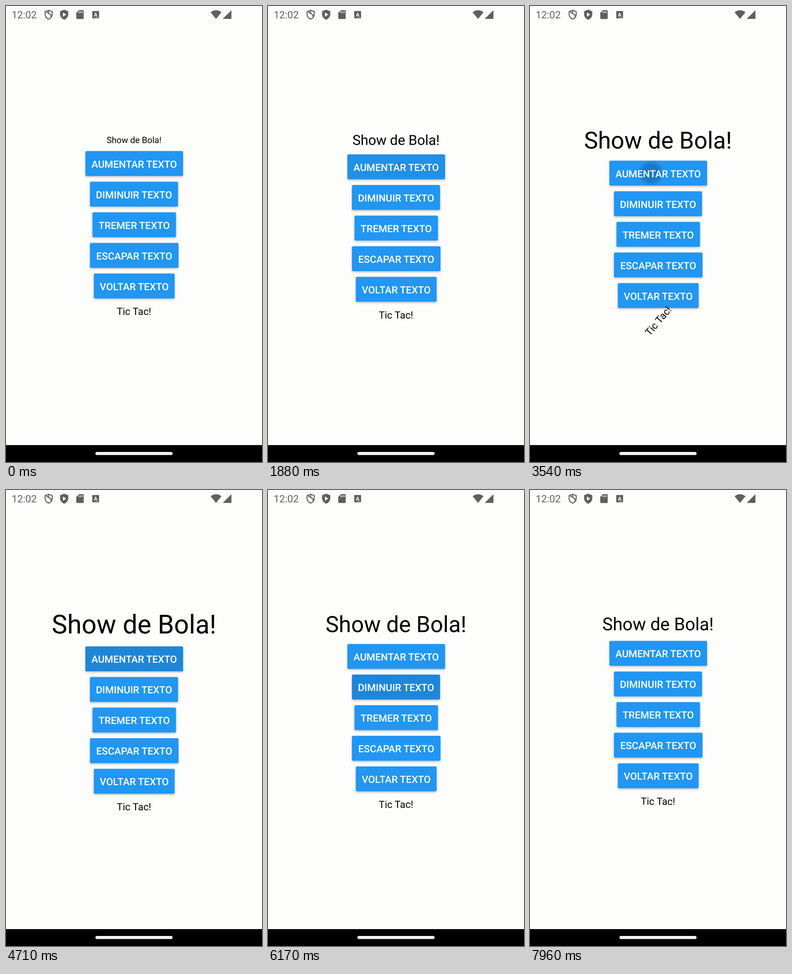
These frames come from a looping animation (561x998 px, 8 s). An HTML page:

```html
<!DOCTYPE html>
<html lang="pt">
<head>
<meta charset="utf-8">
<title>Show de Bola!</title>
<style>
  html, body { margin: 0; width: 100%; height: 100%; overflow: hidden; background: #fdfdfc; }
  svg { display: block; width: 100%; height: 100%; }
  text { font-family: Roboto, "Noto Sans", sans-serif; text-rendering: geometricPrecision; }
  .mid { text-anchor: middle; }
  .label { font-size: 21.8px; font-weight: 500; fill: #fff; }
  .face { fill: #2196f3; filter: drop-shadow(0 2px 2.5px rgba(0, 0, 0, .27)); }
</style>
</head>
<body>
<svg viewBox="0 0 561 998" preserveAspectRatio="none">
  <defs>
    <radialGradient id="ink">
      <stop offset=".6"/>
      <stop offset="1" stop-opacity="0"/>
    </radialGradient>
  </defs>
  <rect width="561" height="998" fill="#fdfdfc"/>

  <g fill="#5f5f5f">
    <text x="12.5" y="27.3" font-size="22">12:02</text>
    <g fill="none" stroke="#5f5f5f" stroke-width="2.2">
      <path d="M93.5 9.3 101.3 12.2V18C101.3 23 98 27 93.5 28.8 89 27 85.7 23 85.7 18V12.2Z"/>
      <path d="M88 12.5 98.5 19.5V23.5"/>
      <path d="M93.5 10V15.5"/>
    </g>
    <path d="M127.5 8 136.5 11.5V18C136.5 23.5 132.8 28 127.5 30 122.2 28 118.5 23.5 118.5 18V11.5Z"/>
    <path d="M124.8 14.2V23.4L132 18.8Z" fill="#fdfdfc"/>
    <path d="M160 9H168.500Q170.300 9 170.300 11V26.500Q170.300 28.500 168.500 28.500H156Q154 28.500 154 26.500V15Z"/>
    <path d="M160 11.500V15.500M163.500 11.500V15.500M167 11.500V15.500" stroke="#fdfdfc" stroke-width="1.600"/>
    <rect x="189" y="11" width="15" height="16" rx="1"/>
    <text class="mid" x="196.300" y="22.800" font-size="11.500" font-weight="700" style="fill:#fdfdfc">A</text>
    <path d="M196 25H202.500" stroke="#fdfdfc" stroke-width="1.200" stroke-dasharray="1.500 1"/>
    <path d="M460.300 28.300 448.400 13.700Q460.300 4.800 472.200 13.700Z"/>
    <path d="M494 9.200V28.300H474.800Z"/>
  </g>

  <text id="title" class="mid" x="280.500"></text>
  <g id="column"></g>
  <text id="clock" class="mid" y="8.300" font-size="21.800">Tic Tac!</text>

  <rect y="961" width="561" height="37"/>
  <rect x="196" y="976" width="169" height="6.800" rx="3.400" fill="#f3f3f3"/>
</svg>
<script>
const LOOP = 8000, BASE = 19.1, HEIGHT = 54.5, PITCH = 67;
const $ = id => document.getElementById(id);
const clamp = v => Math.max(0, Math.min(1, v));

const make = (parent, tag, attrs, text = '') => {
  const el = document.createElementNS('http://www.w3.org/2000/svg', tag);
  for (const k in attrs) el.setAttribute(k, attrs[k]);
  el.textContent = text;
  return parent.appendChild(el);
};

// label, left edge, width
const inkLayers = [
  ['AUMENTAR TEXTO', 174, 214],
  ['DIMINUIR TEXTO', 184, 193],
  ['TREMER TEXTO', 189.5, 183],
  ['ESCAPAR TEXTO', 184, 194],
  ['VOLTAR TEXTO', 192.5, 177]
].map(([label, x, width], i) => {
  const box = { x, width, height: HEIGHT, rx: 2.7 };
  const g = make($('column'), 'g', { transform: `translate(0 ${i * PITCH})` });
  make(g, 'rect', { ...box, class: 'face' });
  make(make(g, 'clipPath', { id: 'clip' + i }), 'rect', box);
  const ink = make(g, 'g', { 'clip-path': `url(#clip${i})` });
  make(g, 'text', { class: 'mid label', x: x + width / 2, y: 36 }, label);
  return ink;
});

// time, button, x
const taps = [
  [1050, 0, 285], [1450, 0, 285], [1850, 0, 290], [2240, 0, 290], [2400, 0, 295],
  [3480, 0, 265], [4400, 0, 275], [5860, 1, 275], [6750, 1, 280], [7250, 1, 280]
].map(([at, button, cx]) => ({
  at, dot: make(inkLayers[button], 'circle', { cx, cy: 27, fill: 'url(#ink)' })
}));

// time, title font size
const sizes = [
  [0, BASE], [1000, BASE], [2540, 38.8], [3540, 51.5], [4250, 57.3],
  [5650, 57.3], [6170, 49.1], [6700, 49.1], [7900, 38.8], [LOOP, 38.8]
];

function sizeAt(t) {
  const i = sizes.findIndex(k => k[0] > t);
  const [t0, a] = sizes[i - 1], [t1, b] = sizes[i];
  return a + (b - a) * (t - t0) / (t1 - t0);
}

// one full swing left and right, then a rest
function swingAt(t) {
  const period = 1405, half = 385;
  const u = (t - 7960 + 6.5 * period) % period - period / 2;
  return Math.abs(u) < half ? 50 * Math.sin(Math.PI * u / half) : 0;
}

function ripple({ at, dot }, t) {
  const age = t - at, p = clamp(age / 300);
  dot.setAttribute('r', 5 + 230 * p * p * (3 - 2 * p));
  dot.setAttribute('opacity', .2 * clamp(age / 60) * clamp((500 - age) / 350));
}

function draw(t) {
  const size = sizeAt(t), drop = .65 * (size - BASE);
  $('title').setAttribute('font-size', size);
  $('title').setAttribute('y', 293 + .363 * size);
  $('column').setAttribute('transform', `translate(0 ${317.5 + drop})`);
  $('clock').setAttribute('transform', `translate(280.5 ${667.9 + drop}) rotate(${swingAt(t)})`);
  taps.forEach(tap => ripple(tap, t));
}

$('title').textContent = 'Show de Bola!';
const start = performance.now();
function tick() {
  draw((performance.now() - start) % LOOP);
  requestAnimationFrame(tick);
}
tick();
</script>
</body>
</html>
```
